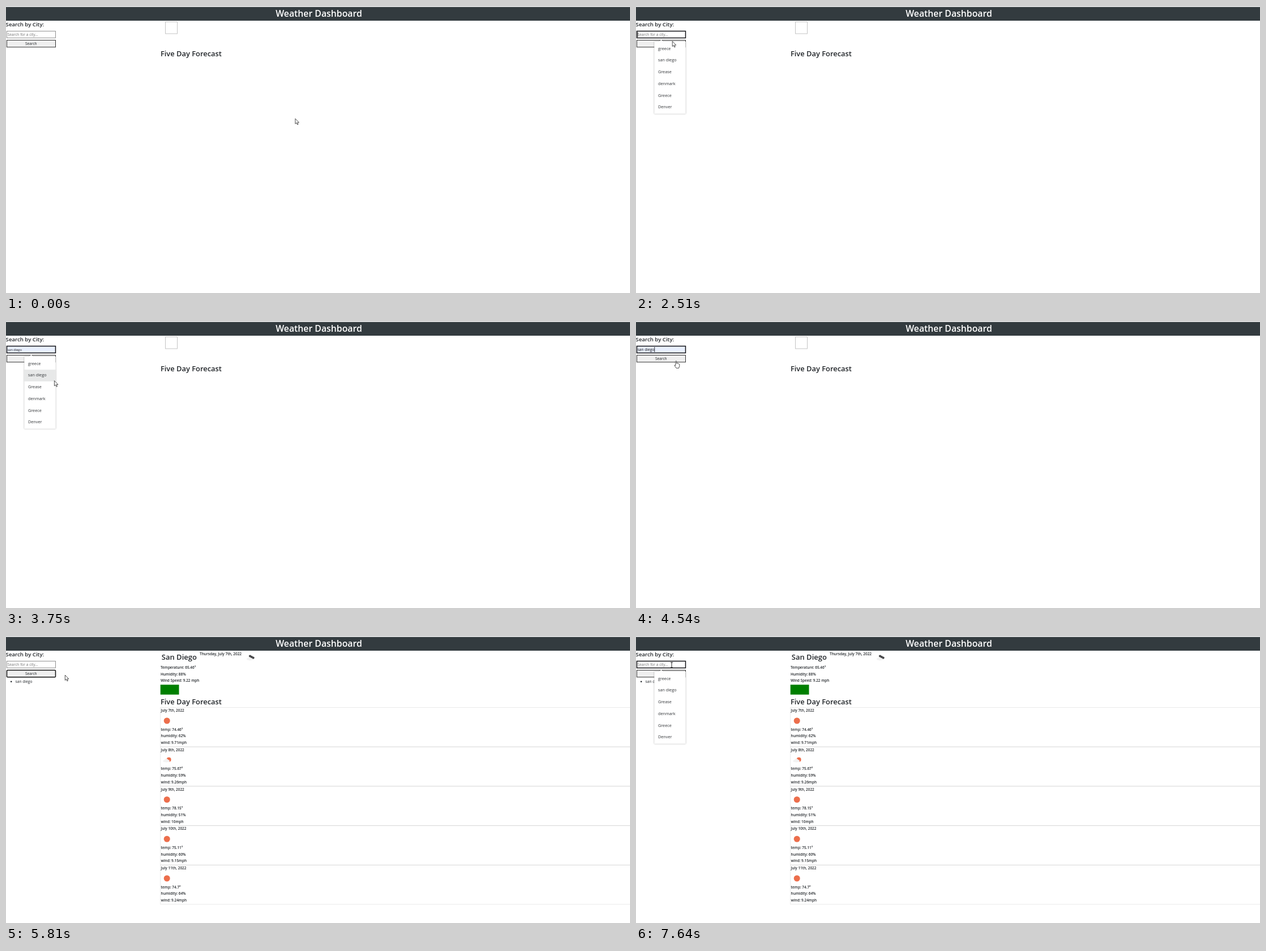
An HTML page that plays this animation: 1102x508 px, repeating every 8 s.

```html
<!DOCTYPE html>
<html lang="en">
<head>
<meta charset="utf-8">
<title>Weather Dashboard</title>
<style>
  html, body { margin: 0; width: 100%; height: 100%; overflow: hidden; background: #fff; }
  svg { display: block; width: 100%; height: 100%; }
  text { font-family: "Open Sans", "Noto Sans", sans-serif; fill: #212529; white-space: pre; }
  .strong { font-weight: 600; }
  #popup { filter: drop-shadow(0 .5px .8px rgba(0, 0, 0, .35)); }
</style>
</head>
<body>
<svg id="stage" viewBox="0 0 1102 508" xmlns="http://www.w3.org/2000/svg"></svg>
<script>
const LOOP = 8000;
const NS = "http://www.w3.org/2000/svg";
const stage = document.getElementById("stage");

function add(parent, tag, attrs = {}, content) {
  const node = document.createElementNS(NS, tag);
  set(node, attrs);
  if (content !== undefined) node.textContent = content;
  parent.appendChild(node);
  return node;
}
function set(node, attrs) { for (const key in attrs) node.setAttribute(key, attrs[key]); }
const show = (node, on) => node.setAttribute("visibility", on ? "inherit" : "hidden");
const group = attrs => add(stage, "g", attrs);
const rect = (parent, x, y, width, height, attrs) =>
  add(parent, "rect", { x, y, width, height, ...attrs });
const circle = (parent, cx, cy, r, fill) => add(parent, "circle", { cx, cy, r, fill });
const label = (parent, text, x, y, size, attrs) =>
  add(parent, "text", { x, y, "font-size": size, ...attrs }, text);
const STRONG = { class: "strong" };
const CENTER = { "text-anchor": "middle" };

// Header and search form
rect(stage, 0, 1.6, 1102, 24.4, { fill: "#333b3f" });
label(stage, "Weather Dashboard", 552.5, 19, 15.8, { ...STRONG, ...CENTER, style: "fill:#fff" });
label(stage, "Search by City:", -0.4, 35.7, 9.65, STRONG);

const input = rect(stage, 1.5, 44.5, 86, 12);
const inputText = label(stage, "", 2.7, 53, 6.6);
const caret = rect(stage, 2.6, 46, .8, 9, { fill: "#000" });
const button = rect(stage, 1.5, 60.5, 86, 12.3, { fill: "#efefef" });
label(stage, "Search", 44.3, 69.1, 6.6, CENTER);

const history = group();
circle(history, 9.2, 80.8, 1.3, "#212529");
label(history, "san diego", 16.5, 83, 6.7);

// Current weather
const cityName = label(stage, "San Diego", 274.8, 42, 13, STRONG);
const emptyIcon = rect(stage, 281.5, 28, 21, 21, { fill: "none", stroke: "#c4c4c4" });
const heading = label(stage, "Five Day Forecast", 272.9, 89.3, 12.9, STRONG);
const results = group();
const small = (text, x, y) => label(results, text, x, y, 6.42, STRONG);

// A row of puffs from left to right
function cloud(x, y, fill) {
  [2, 3.3, 2].forEach((r, i) => circle(results, x + 2.5 + i * 3.7, y + 5.2 - r * .45, r, fill));
}

label(results, "Thursday, July 7th, 2022", 342, 34.4, 6.5, STRONG);
cloud(424.5, 36.5, "#f2f2f2");
for (let i = 0; i < 3; i++) circle(results, 431 + i * 2.8, 35.6 + i * 1.5, 2.1, "#48484a");
["Temperature: 65.46°", "Humidity: 88%", "Wind Speed: 9.22 mph"]
  .forEach((line, i) => small(line, 272.9, 58.3 + i * 11.5));
rect(results, 272.7, 86.2, 32.8, 17.5, { fill: "#008000" });

// Forecast cards
const CARD_STEP = 69.75;
const SUN = "#ec6e4c";
function card(i, ...lines) {
  const y = 126.6 + i * CARD_STEP;
  rect(results, 272.8, y, 840, CARD_STEP - .4,
    { fill: "none", stroke: "#000", "stroke-opacity": .125, "stroke-width": .7 });
  small(`July ${7 + i}th, 2022`, 273.6, y + 7.5);
  if (i === 1) {
    circle(results, 287.6, y + 22.3, 4, SUN);
    cloud(277, y + 20.5, "#f2f2f2");
  } else {
    circle(results, 284.2, y + 23.4, 5.5, SUN);
  }
  lines.forEach((line, k) => small(line, 273.6, y + 41 + k * 11.75));
}
card(0, "temp: 74.46°", "humidity: 62%", "wind: 9.71mph");
card(1, "temp: 75.67°", "humidity: 59%", "wind: 9.26mph");
card(2, "temp: 78.15°", "humidity: 51%", "wind: 10mph");
card(3, "temp: 75.11°", "humidity: 60%", "wind: 9.15mph");
card(4, "temp: 74.7°", "humidity: 64%", "wind: 9.24mph");

// Suggestions
const CITIES = ["greece", "san diego", "Grease", "denmark", "Greece", "Denver"];
const ROW_TOP = 65, ROW_STEP = 20.75;
const popup = group({ id: "popup" });
add(popup, "path", { fill: "#fff", d: "M32.3 63H41L44.5 59.6L48 63H87.7V190.8H32.3Z" });
const highlight = rect(popup, 32.3, 0, 55.4, ROW_STEP, { fill: "#e7e8e8" });
CITIES.forEach((city, i) =>
  label(popup, city, 39, 77.6 + i * ROW_STEP, 7.25, { style: "fill:#303336" }));

// Pointers, each with its hot spot at 0,0
const pointer = group();
const outline = { fill: "#fff", stroke: "#222", "stroke-width": .8, "stroke-linejoin": "round" };
const arrow = add(pointer, "path",
  { ...outline, d: "M.4 .4V9.6L2.5 7.7L4 11L5.5 10.4L4.1 7.2H6.9Z" });
const beam = add(pointer, "path",
  { fill: "none", stroke: "#111", "stroke-width": .9, d: "M-2 -4.5H2M0 -4.5V4.5M-2 4.5H2" });
const hand = add(pointer, "path", { ...outline,
  d: "M-.9 1Q0 -.2 .9 1V4.6Q3.5 3.8 6 6.3V9L4.8 13H.3L-2.7 8.6Q-3 6.9 -.9 8.2Z" });

// The pointer goes from one stop to the next, some ways bent towards a control point
const STEP = 77;
const moves = [];
let last = { x: 510.5, y: 199 };
function move(start, end, x, y, bend) {
  const to = { x, y };
  const middle = { x: (last.x + x) / 2, y: (last.y + y) / 2 };
  moves.push({ start, end, from: last, bend: bend || middle, to });
  last = to;
}
move(0, 0, 510.5, 199);
move(90, 710, 612, 404);
move(870, 1020, 575, 449);
move(1025, 1630, 43.5, 51, { x: -102, y: 105 });
move(1700, 1790, 43.5, 53);
move(2280, 3060, 92, 94, { x: 74, y: 61 });
move(3130, 3515, 87, 133);
move(3520, 3910, 84, 91);
move(4060, 4520, 70.8, 70.4);
move(5810, 6200, 507, 197, { x: 148, y: 52 });
move(6230, 6590, 74, 47);
move(6660, 6990, 33, 47);
move(7310, 7470, 63, 51.3);

function pointerAt(t) {
  const { start, end, from, bend, to } = moves.filter(m => t >= m.start).pop();
  const steps = Math.floor((t - start) / STEP + .1) + 1;
  const u = Math.min(1, steps * STEP / (end - start + STEP));
  const curve = axis =>
    (1 - u) ** 2 * from[axis] + 2 * u * (1 - u) * bend[axis] + u * u * to[axis];
  return [curve("x"), curve("y")];
}

const within = (t, a, b) => t >= a && t < b;
const blink = (t, start) => Math.floor((t - start) / 530) % 2 === 0;

function render(t) {
  const [x, y] = pointerAt(t);
  const open = within(t, 2110, 4060) || t >= 7160;
  const chosen = within(t, 4060, 4920);
  const focused = within(t, 2110, 4770) || t >= 6990;
  const overForm = x > 1 && x < 88;
  const overInput = overForm && y > 44 && y < 57;
  const overButton = overForm && y > 60 && y < 73 && !(open && x > 32);
  const overPopup = open && x > 32 && x < 88 && y > ROW_TOP;
  const row = overPopup ? Math.floor((y - ROW_TOP) / ROW_STEP) : -1;
  const preview = CITIES[row];
  const filled = preview || chosen;

  set(input, {
    fill: filled ? "#e8effe" : "#fff",
    stroke: focused ? "#101014" : "#858585",
    "stroke-width": focused ? 1.5 : .9
  });
  inputText.textContent = preview || (chosen ? "san diego" : "Search for a city...");
  set(inputText, {
    "font-size": preview ? 5.6 : 6.6,
    style: `fill:${filled ? "#111" : "#757575"}`
  });
  const caretOn = t >= 6990 ? t < 7640 : blink(t, chosen ? 4060 : 2110);
  show(caret, focused && !preview && caretOn);
  set(caret, { x: chosen ? 32.4 : 2.6 });

  const ring = within(t, 4770, 7160);
  set(button, {
    stroke: ring ? "#101010" : "#333", "stroke-width": ring ? 1.5 : 1, rx: ring ? 1.3 : 0
  });

  show(popup, open);
  show(highlight, open && preview);
  set(highlight, { y: ROW_TOP + .4 + row * ROW_STEP });

  const named = t >= 5080, loaded = t >= 5320;
  show(history, t >= 4920);
  show(cityName, named);
  show(emptyIcon, !loaded);
  set(emptyIcon, { x: named ? 345.5 : 281.5 });
  show(results, loaded);
  set(heading, { y: loaded ? 121 : 89.3 });

  set(pointer, { transform: `translate(${x} ${y})` });
  show(beam, overInput);
  show(hand, overButton);
  show(arrow, !overInput && !overButton);
}

const began = performance.now();
function tick() {
  render((performance.now() - began) % LOOP);
  requestAnimationFrame(tick);
}
tick();
</script>
</body>
</html>
```
